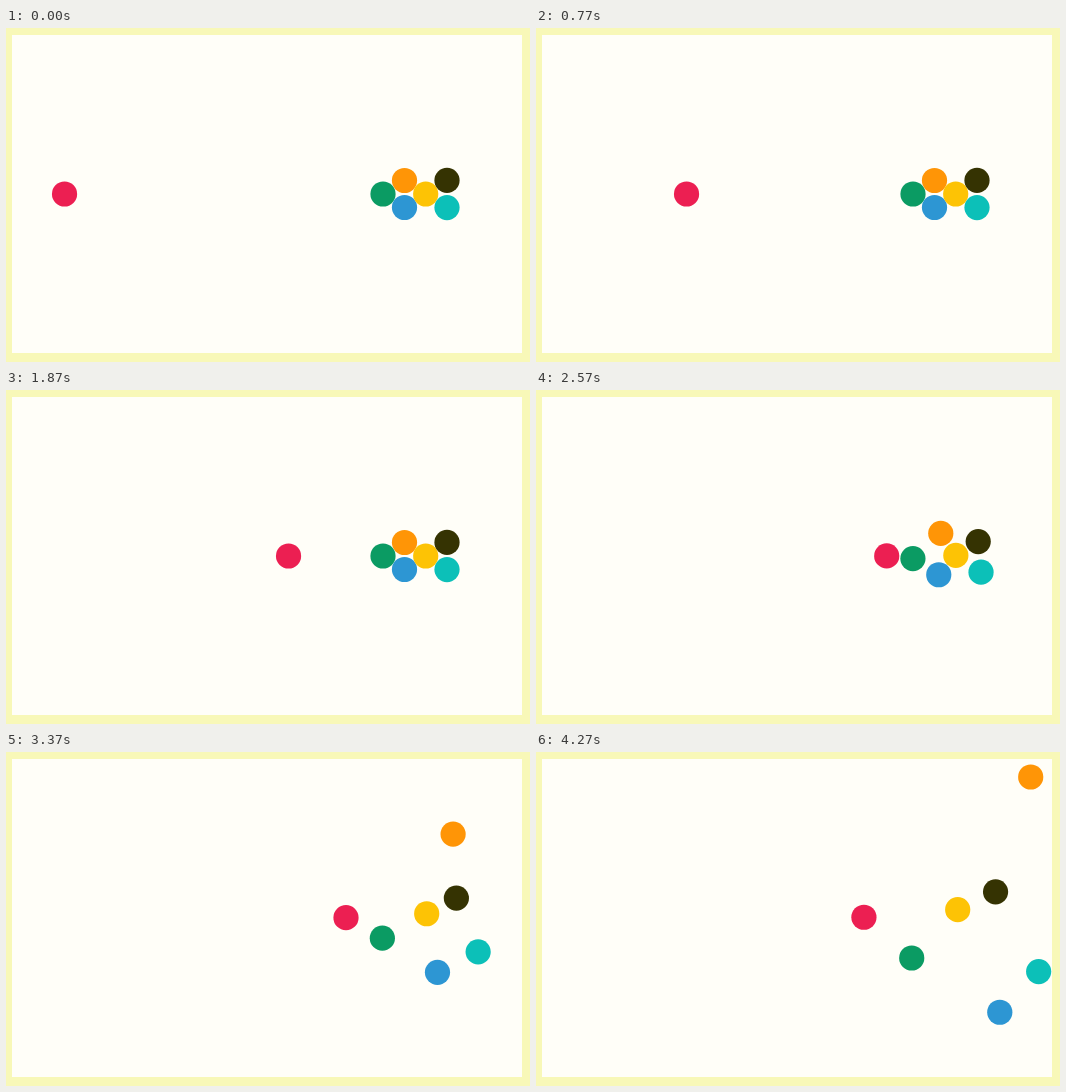
Animation of 524 by 334 pixels, one loop 4.31 s. Source, as an HTML page with a canvas:

```html
<!DOCTYPE html>
<html>
<head>
<meta charset="utf-8">
<title>Billiard break</title>
<style>
html, body { margin: 0; width: 100%; height: 100%; overflow: hidden; }
canvas { display: block; }
</style>
</head>
<body>
<canvas width="524" height="334"></canvas>
<script>
const ctx = document.querySelector('canvas').getContext('2d');
const LOOP = 4310, STEP = 100 / 3, HIT = 2448, RADIUS = 12.6;
const TOP = 19; // highest centre a ball reaches before it bounces
const CUE_SPEED = 0.12;

// colour, position at the hit, velocity after it (px per ms)
const balls = [
  ['#ec1f52', 352.3, 166, -0.0134, -0.0004],
  ['#0b9b63', 377, 166, -0.0007, 0.022],
  ['#ff9506', 398.5, 152.5, 0.0529, -0.0767],
  ['#2d96d3', 398.5, 179.5, 0.0359, 0.0444],
  ['#fdc305', 419.7, 166, 0.0011, -0.0046],
  ['#353302', 441, 152.4, 0.0102, -0.0069],
  ['#0cc0b8', 441, 179.6, 0.0339, 0.022]
];

function draw(time) {
  ctx.fillStyle = '#f8f8b8';
  ctx.fillRect(0, 0, 524, 334);
  ctx.fillStyle = '#fffef8';
  ctx.fillRect(6, 7, 510, 318);

  const t = time - HIT, after = Math.max(0, t);
  balls.forEach(([color, x0, y0, vx, vy], i) => {
    const x = x0 + vx * after + (i === 0 ? CUE_SPEED * Math.min(0, t) : 0);
    const y = TOP + Math.abs(y0 + vy * after - TOP);
    ctx.fillStyle = color;
    ctx.beginPath();
    ctx.arc(x, y, RADIUS, 0, 2 * Math.PI);
    ctx.fill();
  });
}

const start = performance.now();
function frame() {
  const t = (performance.now() - start) % LOOP;
  draw(Math.min(128, Math.floor((t + 5) / STEP)) * STEP);
  requestAnimationFrame(frame);
}
frame();
</script>
</body>
</html>
```
